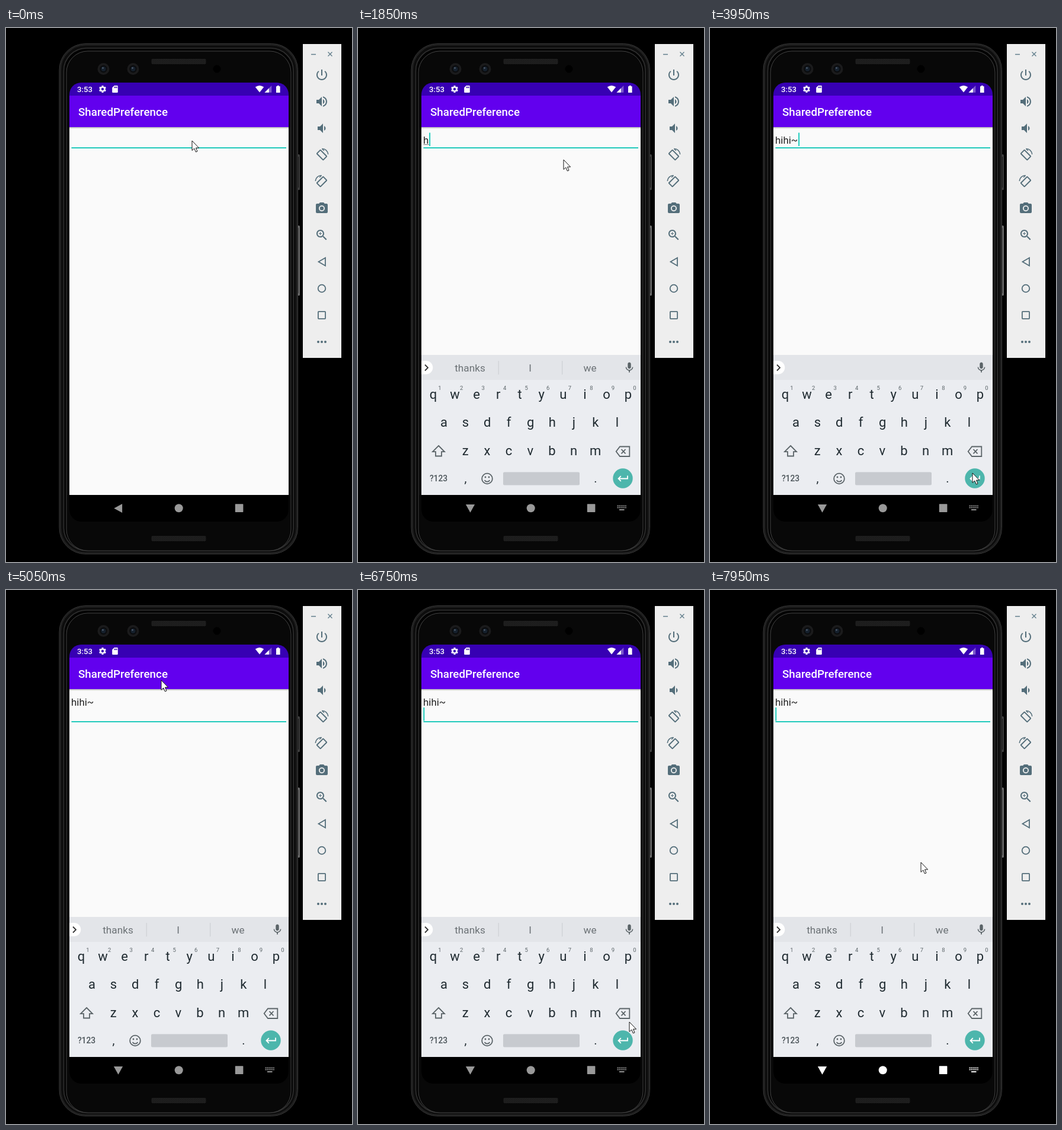
An HTML page that plays this animation: 584x900 px, repeating every 8000 ms.

```html
<!DOCTYPE html>
<html lang="en">
<head>
<meta charset="utf-8">
<title>SharedPreference</title>
<style>
html, body { margin: 0; width: 100%; height: 100%; overflow: hidden; background: #000; }
svg { display: block; width: 584px; height: 900px; font-family: Roboto, sans-serif; }
text { white-space: pre; }
.mid { text-anchor: middle; }
.line { fill: none; stroke-width: 1.8; }
</style>
</head>
<body>
<svg id="stage" viewBox="0 0 584 900"></svg>
<script>
const LOOP = 8000, STEP = 50;

const rect = (x, y, w, h, fill, more = '') =>
  `<rect x="${x}" y="${y}" width="${w}" height="${h}" fill="${fill}" ${more}/>`;
const circle = (x, y, r, fill, more = '') =>
  `<circle cx="${x}" cy="${y}" r="${r}" fill="${fill}" ${more}/>`;
const path = (d, more = '') => `<path d="${d}" ${more}/>`;
const label = (x, y, size, fill, str, more = '') =>
  `<text x="${x}" y="${y}" font-size="${size}" fill="${fill}" ${more}>${str}</text>`;
// Places a drawing made on a 24-unit grid around a centre.
const icon = (x, y, scale, body) =>
  `<g transform="translate(${x} ${y}) scale(${scale}) translate(-12 -12)">${body}</g>`;

const POWER = 'M13 3h-2v10h2V3zm4.83 2.17l-1.42 1.42C17.99 7.86 19 9.81 19 12c0 3.87-3.13 7-7 7s-7-3.13-7-7c0-2.19 1.01-4.14 2.58-5.42L6.17 5.17C4.23 6.82 3 9.26 3 12c0 4.97 4.03 9 9 9s9-4.03 9-9c0-2.74-1.23-5.18-3.17-6.83z';
const LOUD = 'M3 9v6h4l5 5V4L7 9H3zm13.5 3c0-1.77-1.02-3.29-2.5-4.03v8.05c1.48-.73 2.5-2.25 2.5-4.02zM14 3.23v2.06c2.89.86 5 3.54 5 6.71s-2.11 5.85-5 6.71v2.06c4.01-.91 7-4.49 7-8.77s-2.99-7.86-7-8.77z';
const QUIET = 'M18.5 12c0-1.77-1.02-3.29-2.5-4.03v8.05c1.48-.73 2.5-2.25 2.5-4.02zM5 9v6h4l5 5V4L9 9H5z';
const CAMERA = 'M9 2L7.17 4H4c-1.1 0-2 .9-2 2v12c0 1.1.9 2 2 2h16c1.1 0 2-.9 2-2V6c0-1.1-.9-2-2-2h-3.17L15 2H9zm3 15c-2.76 0-5-2.24-5-5s2.24-5 5-5 5 2.24 5 5-2.24 5-5 5z';
const ZOOM = 'M15.5 14h-.79l-.28-.27C15.41 12.59 16 11.11 16 9.5 16 5.91 13.09 3 9.5 3S3 5.91 3 9.5 5.91 16 9.5 16c1.61 0 3.09-.59 4.23-1.57l.27.28v.79l5 4.99L20.49 19l-4.99-5zm-6 0C7.01 14 5 11.99 5 9.5S7.01 5 9.5 5 14 7.01 14 9.5 11.99 14 9.5 14zm2.5-4h-2v2H9v-2H7V9h2V7h1v2h2v1z';
const GEAR = 'M19.14 12.94c.04-.3.06-.61.06-.94 0-.32-.02-.64-.07-.94l2.03-1.58c.18-.14.23-.41.12-.61l-1.92-3.32c-.12-.22-.37-.29-.59-.22l-2.39.96c-.5-.38-1.03-.7-1.62-.94l-.36-2.54c-.04-.24-.24-.41-.48-.41h-3.84c-.24 0-.43.17-.47.41l-.36 2.54c-.59.24-1.13.57-1.62.94l-2.39-.96c-.22-.08-.47 0-.59.22L2.74 8.87c-.12.21-.08.47.12.61l2.03 1.58c-.05.3-.09.63-.09.94s.02.64.07.94l-2.03 1.58c-.18.14-.23.41-.12.61l1.92 3.32c.12.22.37.29.59.22l2.39-.96c.5.38 1.03.7 1.62.94l.36 2.54c.05.24.24.41.48.41h3.84c.24 0 .44-.17.47-.41l.36-2.54c.59-.24 1.13-.56 1.62-.94l2.39.96c.22.08.47 0 .59-.22l1.92-3.32c.12-.22.07-.47-.12-.61l-2.01-1.58zM12 15.6c-1.98 0-3.6-1.62-3.6-3.6s1.62-3.6 3.6-3.6 3.6 1.62 3.6 3.6-1.62 3.6-3.6 3.6z';
const MIC = 'M12 14c1.66 0 3-1.34 3-3V5c0-1.66-1.34-3-3-3S9 3.34 9 5v6c0 1.66 1.34 3 3 3zm5.3-3c0 3-2.54 5.1-5.3 5.1S6.7 14 6.7 11H5c0 3.41 2.72 6.23 6 6.72V21h2v-3.28c3.28-.48 6-3.3 6-6.72h-1.7z';

function phone() {
  const grill = y => rect(245.5, y, 92, 9, 'url(#mesh)', 'rx="2"');
  const lens = x => circle(x, 69, 10, '#1b1b1c') + circle(x, 69, 6.2, '#0b0c0e') +
    circle(x, 69, 4, '#15202c') + circle(x - 1, 67.5, 1.4, '#4a5666');
  return rect(491, 213, 5, 60, '#3d3d3d', 'rx="1.5"') + rect(491, 333, 5, 118, '#6b6b6b', 'rx="1.5"') +
    rect(492, 217, 2, 52, '#111') + rect(491.5, 337, 2, 110, '#151515') +
    rect(90, 26.5, 402.5, 860, '#0d0d0d', 'rx="44" stroke="#3d3d3d"') +
    rect(92, 28.5, 398.5, 856, 'none', 'rx="42" stroke="#222" stroke-width="2"') +
    rect(97.5, 34, 387.5, 846.5, '#030303', 'rx="38" stroke="#303030" stroke-width="1.6"') +
    rect(102, 39, 379, 842, '#080808', 'rx="36" stroke="#4a4a4a" stroke-width=".9"') +
    grill(52) + grill(856) + lens(164.5) + lens(214.5) + circle(356, 69, 6.5, '#000');
}

function toolbar() {
  const rotate = '<g fill="none" stroke="#546e7a" stroke-width="1.9">' +
    rect(7.7, 4.4, 8.6, 15.2, 'none', 'transform="rotate(-45 12 12)" rx=".8"') +
    path('M12.5 1.5C18 1.3 22.2 5.5 22.7 11', 'stroke-width="1.5"') +
    path('M12.5 1.5l3.4 3.3', 'stroke-width="1.5"') + '</g>';
  const dots = [6, 12, 18].map(x => circle(x, 12, 2, '#546e7a')).join('');
  const items = [path(POWER), path(LOUD), path(QUIET), rotate,
    `<g transform="matrix(-1 0 0 1 24 0)">${rotate}</g>`,
    path(CAMERA) + circle(12, 12, 3.2, '#546e7a'), path(ZOOM),
    path('M6.5 12L18 5.3V18.7z', 'class="line" stroke="#546e7a"'),
    circle(12, 12, 6.3, 'none', 'class="line" stroke="#546e7a"'),
    rect(5.9, 5.9, 12.2, 12.2, 'none', 'rx="1" class="line" stroke="#546e7a"'), dots];
  return rect(501, 27, 65, 529, '#eeeeee') + '<g fill="#546e7a">' +
    path('M515 44.5h8M543.5 40.5l7 7m0-7l-7 7', 'stroke="#607d8b" stroke-width="1.4"') +
    items.map((body, i) => icon(533, 79 + 45 * i, 1, body)).join('') + '</g>';
}

function statusBar() {
  return rect(107, 92, 370, 22.5, '#3700b3') +
    label(120, 108, 13.2, '#fff', '3:53', 'font-weight="500"') + '<g fill="#fff">' +
    icon(163, 103, .62, path(GEAR)) +
    icon(184, 103, .6, path('M18 2h-8L4 8v12a2 2 0 0 0 2 2h12a2 2 0 0 0 2-2V4a2 2 0 0 0-2-2zM10 5v4h2V5zM13 5v4h2V5zM16 5v4h2V5z', 'fill-rule="evenodd"')) +
    path('M420.8 99.6Q428 94.2 435.2 99.6L428 108.6z') +
    path('M448.3 97V108.8H436.5z', 'opacity=".35"') + path('M443.8 101.5V108.8H436.5z') +
    path('M456 98.3h1.8v-1.3h3v1.3h1.8v10.7h-6.6z') + '</g>';
}

function keyboard() {
  const ink = '#1f2a30', soft = '#5b6468';
  const row = (keys, x, y) => [...keys].map((k, i) =>
    label(x + 36.55 * i, y, 22, ink, k, 'class="mid"')).join('');
  const hints = [...'1234567890'].map((k, i) =>
    label(138 + 36.55 * i, 609.5, 9.5, soft, k, 'class="mid"')).join('');
  return rect(107, 551, 370, 236, '#ebedf1') + rect(107, 551, 370, 42, '#e3e5e9') +
    '<g id="words">' + rect(236.7, 561, 1, 23, '#c9ccd0') + rect(344.2, 561, 1, 23, '#c9ccd0') +
    [189, 290.5, 391.5].map(x => label(x, 579, 17.2, '#6b7175', '', 'class="mid word"')).join('') + '</g>' +
    path('M107 561H115A11.3 11.3 0 0 1 115 583.6H107z', 'fill="#fff"') +
    path('M113 567.5l5 5-5 5', 'class="line" stroke="#333"') +
    `<g fill="${soft}">${icon(458, 572.5, .9, path(MIC))}</g>` +
    row('qwertyuiop', 127, 625) + hints + row('asdfghjkl', 145, 671.5) + row('zxcvbnm', 181.3, 719.5) +
    `<g class="line" stroke="${soft}">` +
    path('M136 704l10 10.2h-5V721.5H131V714.2H126z') +
    path('M442 705.5H458.3V722H442L435.7 713.7z') + path('M444.5 710l7 7.4m0-7.4l-7 7.4') +
    circle(218, 759.5, 8.8, 'none') + path('M213.8 762a4.6 4.6 0 0 0 8.4 0') + '</g>' +
    circle(215, 757, 1.4, soft) + circle(221, 757, 1.4, soft) +
    label(136, 764, 13.8, '#4b5459', '?123', 'class="mid" font-weight="500"') +
    label(181.5, 765.5, 20, ink, ',', 'class="mid"') + label(401, 765.5, 20, ink, '.', 'class="mid"') +
    rect(245, 748.5, 129, 22, '#c7cacf', 'rx="2"') + circle(447, 759, 16.7, '#4db6ac') +
    path('M455 754.5v5H439.5m4.3-4.3l-4.3 4.3 4.3 4.3', 'class="line" stroke="#fff"');
}

function navBar() {
  let grid = '';
  for (let i = 0; i < 12; i++) grid += rect(437.5 + i % 6 * 2.7, 804.5 + (i / 6 | 0) * 3, 1.8, 1.8, 'inherit').replace('fill="inherit"', '');
  return path('M107 787H477V812a20 20 0 0 1-20 20H127a20 20 0 0 1-20-20z', 'fill="#000"') +
    rect(378, 787, 31, 45, '#222', 'id="ripple" rx="14"') +
    '<g id="nav">' + path('M-7.2 0L6.6-7.6V7.6z', 'id="back"') +
    '<circle cx="291.7" cy="809.2" r="7"/>' + '<rect x="386.8" y="802.3" width="13.6" height="13.6" rx=".6"/>' +
    `<g id="imeSwitch">${grid}<rect x="441" y="811" width="8.5" height="1.9"/></g></g>`;
}

document.getElementById('stage').innerHTML = `<defs>
  <pattern id="mesh" width="3" height="3" patternUnits="userSpaceOnUse">${rect(0, 0, 3, 3, '#242424') + rect(0, 0, 1.3, 1.3, '#111') + rect(1.5, 1.5, 1.3, 1.3, '#111')}</pattern>
  <linearGradient id="shade" x2="0" y2="1"><stop stop-color="#b0b0b0"/><stop offset="1" stop-color="#fafafa"/></linearGradient>
  <clipPath id="screen">${rect(107, 92, 370, 740, '#000', 'rx="20"')}</clipPath>
  <clipPath id="content">${rect(107, 167, 370, 620, '#000')}</clipPath></defs>` +
  phone() + '<g clip-path="url(#screen)">' +
  rect(107, 167, 370, 620, '#fafafa') + rect(107, 167, 370, 3, 'url(#shade)') +
  statusBar() + rect(107, 114, 370, 53, '#6200ee') +
  label(122, 148, 18.8, '#fff', 'SharedPreference', 'font-weight="500"') +
  rect(110.5, 201, 362.5, 2, '#22cabc', 'id="underline"') +
  rect(110.5, 196, 0, 1, '#777', 'id="composing"') +
  label(110, 194.5, 16.9, '#212121', '', 'id="typed"') + rect(0, 176.5, 2, 22.5, '#1fcdbd', 'id="caret"') +
  `<g clip-path="url(#content)"><g id="keys">${keyboard()}</g></g>` + navBar() + '</g>' + toolbar() +
  path('M0 0V16.4L3.8 13 6.4 19 9 17.9 6.5 12.1H11.6z', 'id="pointer" fill="#fff" stroke="#111" stroke-width="1"');

const $ = id => document.getElementById(id);
const words = document.querySelectorAll('.word');

// Pointer stops: time, x, y.
const route = [
  [0, 314, 190], [50, 314, 190], [350, 347, 222], [3150, 347, 222], [3550, 405, 560],
  [3800, 440, 735], [3950, 443, 750], [4300, 443, 750], [4500, 462, 690], [4700, 468, 480],
  [4850, 430, 260], [5050, 262, 152], [5170, 120, 75], [5300, 39, 330], [5430, 110, 650],
  [5550, 250, 784], [5680, 420, 690], [5800, 458, 400], [5930, 370, 150], [6050, 250, 109],
  [6170, 120, 220], [6300, 67, 500], [6420, 140, 800], [6500, 250, 881], [6620, 400, 830],
  [6780, 460, 720], [7000, 420, 790], [7200, 393, 810], [7400, 393, 810], [7600, 385, 640],
  [7750, 366, 385], [7900, 356, 459], [8000, 356, 459]];
const blinks = [350, 900, 1400, 3150, 3650, 4150, 4300, 4800, 5300, 5800, 6300, 6800, 7300];
const typing = [[0, ''], [1850, 'h'], [1950, 'hi'], [2000, 'hih'], [2200, 'hihi'], [2600, 'hihi~']];
const guesses = [[0, 'thanks I we'], [1900, 'have how he'], [1950, 'hi his him'], [2050, 'hih high him'],
  [2250, 'hihi hi him'], [2600, ''], [4300, 'thanks I we']];
const ENTER = 4300;

const latest = (list, t) => list.filter(e => e[0] <= t).pop()[1];
const ramp = (t, from, to) => Math.min(1, Math.max(0, (t - from) / (to - from)));

// Cubic Hermite through the stops; zero slope where a coordinate turns or rests.
function pointerAt(t) {
  let i = route.findIndex(p => p[0] > t) - 1;
  const a = route[i], b = route[i + 1], span = b[0] - a[0], u = (t - a[0]) / span;
  const slope = (k, axis) => {
    const p = route[k - 1], q = route[k], r = route[k + 1];
    if (!p || !r || (q[axis] - p[axis]) * (r[axis] - q[axis]) <= 0) return 0;
    return (r[axis] - p[axis]) / (r[0] - p[0]);
  };
  return [1, 2].map(axis => {
    const v = 1 - u;
    return a[axis] * v * v * (1 + 2 * u) + b[axis] * u * u * (3 - 2 * u) +
      span * (slope(i, axis) * u * v * v - slope(i + 1, axis) * u * u * v);
  });
}

function draw(t) {
  const typed = $('typed'), str = latest(typing, t), wrapped = t >= ENTER;
  typed.textContent = str;
  const width = str ? typed.getComputedTextLength() : 0;
  $('composing').setAttribute('width', t < 2600 ? width : 0);
  $('underline').setAttribute('y', wrapped ? 221 : 201);
  $('caret').setAttribute('x', wrapped || !str ? 110.3 : 110.8 + width);
  $('caret').setAttribute('y', wrapped ? 198 : 176.5);
  $('caret').setAttribute('opacity', blinks.filter(b => b <= t).length % 2);

  const guess = latest(guesses, t);
  $('words').setAttribute('opacity', guess ? 1 : 0);
  guess.split(' ').forEach((w, i) => words[i].textContent = w);

  const open = 1 - (1 - ramp(t, 500, 900)) ** 2.5;
  $('keys').setAttribute('transform', `translate(0 ${236 * (1 - open)})`);
  $('back').setAttribute('transform', `translate(189.5 809.5) rotate(${-90 * open})`);
  $('imeSwitch').setAttribute('opacity', open);

  const grey = 153 + Math.round(102 * ramp(t, 7450, 7650));
  $('nav').setAttribute('fill', `rgb(${grey},${grey},${grey})`);
  $('ripple').setAttribute('opacity', ramp(t, 7250, 7350) * (1 - ramp(t, 7450, 7650)));
  $('pointer').setAttribute('transform', `translate(${pointerAt(t).map(Math.round)})`);
}

const start = performance.now();
function tick() {
  const t = (performance.now() - start) % LOOP;
  draw(Math.floor(t / STEP) * STEP);
  requestAnimationFrame(tick);
}
tick();
</script>
</body>
</html>
```
